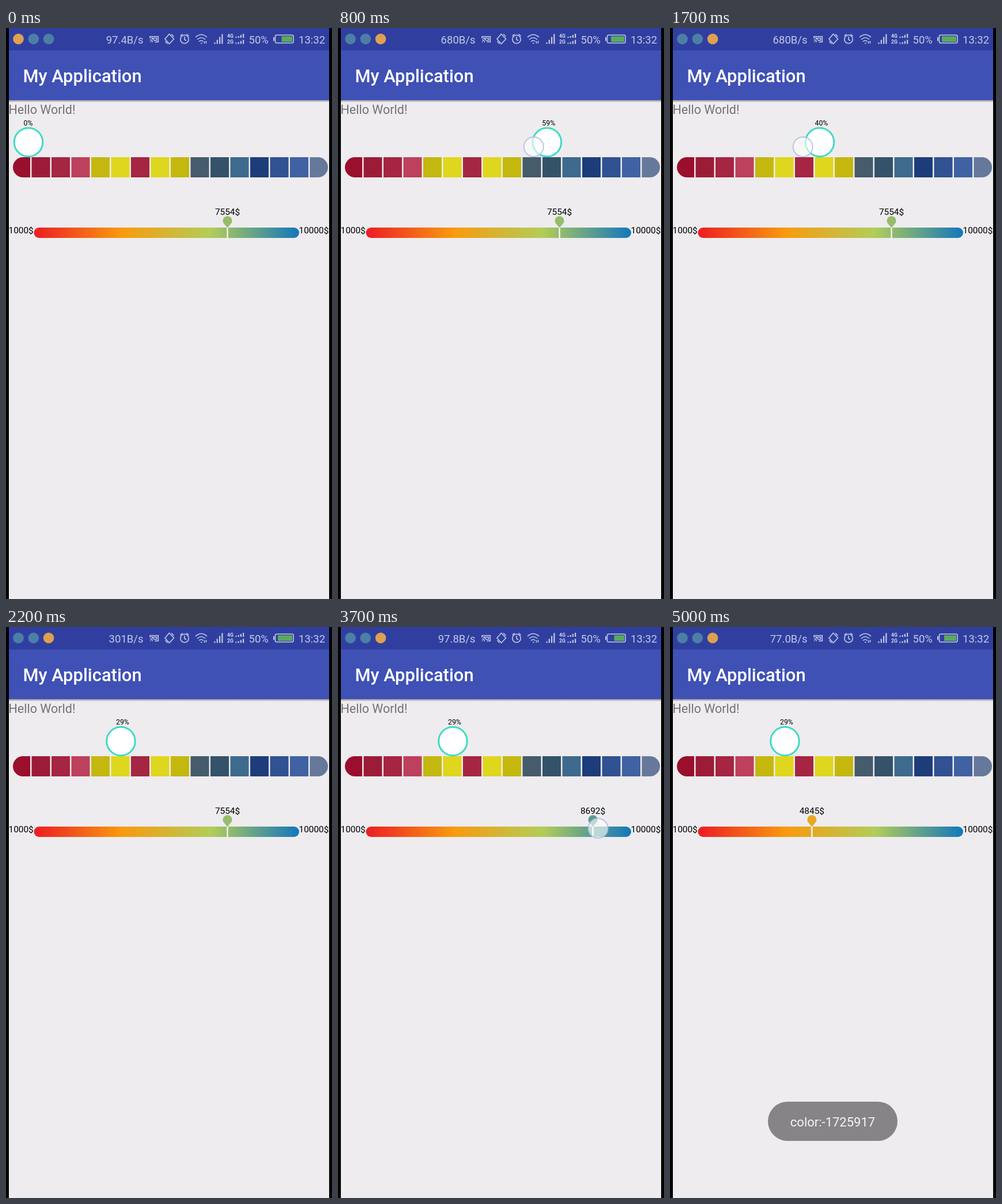
An HTML page for the animation above (5.1 s loop, 566 by 990 pixels).

```html
<!DOCTYPE html>
<html>
<head>
<meta charset="utf-8">
<style>
  html, body { margin: 0; height: 100%; overflow: hidden; background: #000; }
  svg { display: block; width: 566px; height: 990px; font-family: Roboto, sans-serif; }
  .status { fill: #c3c9e6; font-size: 18.5px; }
  .icon { fill: none; stroke: #c3c9e6; stroke-width: 1.6; }
  .net { fill: #d3d8ee; font-size: 8.6px; font-weight: 700; }
  .price { font-size: 15.4px; }
</style>
</head>
<body>
<svg viewBox="0 0 566 990">
  <defs>
    <linearGradient id="ramp"></linearGradient>
    <linearGradient id="shade" x2="0" y2="1">
      <stop stop-color="#8f8f96"/><stop offset="1" stop-color="#eeecee"/>
    </linearGradient>
    <clipPath id="pill"><rect x="12" y="224" width="547" height="35" rx="17.5"/></clipPath>
  </defs>

  <rect width="566" height="990"/>
  <rect x="5" width="556" height="990" fill="#eeecee"/>
  <rect x="5" y="125" width="556" height="4" fill="url(#shade)"/>
  <rect x="5" width="556" height="125" fill="#3f51b5"/>
  <rect x="5" width="556" height="39" fill="#303f9f"/>

  <g id="apps"></g>
  <text id="speed" class="status" x="238.5" y="27" text-anchor="end"></text>
  <g class="icon">
    <path d="M250 18v-3.3h14.3v9.6h-6M250 20.5q4 0 4.300 4M250 23.500q1 0 1.300 1M253 17.500h8.500v4h-4z"/>
    <path d="M283.500 10.500l8 8.500-8 8.500-7.500-8.500zM287 10.500l4.500 4.500M276.500 23l4 4.500"/>
    <circle cx="310" cy="19.500" r="7.200"/>
    <path d="M310 15v5l3 2M302.500 14l4-3.500M317.500 14l-4-3.500"/>
    <path d="M329 16Q339 7 349 16M332 20Q339 13.500 346 20M335 23.500Q339 20 342.500 23.500M338 26.500h2.500M344.500 23v4M347.500 22.500v4"/>
    <path id="bars" stroke-width="2.200"/>
    <rect x="467.500" y="12.300" width="31.500" height="13.700" rx="2.500"/>
    <path d="M465 16v6.500" stroke-width="2"/>
  </g>
  <text class="net" x="384" y="17">4G</text>
  <text class="net" x="384" y="27">2G</text>
  <rect id="charge" y="14.300" height="9.700" fill="#5aab5c"/>
  <text class="status" x="421.500" y="27">50%</text>
  <text class="status" x="508" y="27">13:32</text>

  <text x="29.500" y="94" fill="#fff" font-size="30.9" font-weight="500">My Application</text>
  <text x="4.500" y="149" fill="#737275" font-size="21.5">Hello World!</text>

  <g id="cells" clip-path="url(#pill)"></g>
  <text id="percent" y="169" font-size="12.3"></text>
  <circle id="thumb" cy="198" r="24.800" fill="#fff" stroke="#3cdcc4" stroke-width="3"/>

  <rect x="48.500" y="346" width="460.500" height="18" rx="9" fill="url(#ramp)"/>
  <text class="price" x="4.500" y="356">1000$</text>
  <text class="price" x="508.500" y="356">10000$</text>
  <g id="pin">
    <text id="value" class="price" y="324" text-anchor="middle"></text>
    <path id="drop" d="M-7 338A8 8 0 1 1 7 338L0 346.500Z"/>
    <path d="M0 346v18" stroke="#f6f4f0" stroke-width="2.600"/>
  </g>

  <circle id="touch" r="17" fill="#fff" fill-opacity=".62" stroke="#b4bce0" stroke-opacity=".85" stroke-width="2"/>

  <g id="toast">
    <rect x="170" y="823" width="225" height="68" rx="34" fill="#868486"/>
    <text x="282.500" y="866" fill="#f6f6f6" font-size="22" text-anchor="middle">color:-1725917</text>
  </g>
</svg>
<script>
const $ = id => document.getElementById(id);
const set = (el, attrs) => { for (const k in attrs) el.setAttribute(k, attrs[k]); return el; };
const add = (parent, tag, attrs) =>
  parent.appendChild(set(document.createElementNS('http://www.w3.org/2000/svg', tag), attrs));

const LOOP = 5100, STEP = 100;
const ramp = [[237, 28, 36], [248, 155, 15], [178, 205, 88], [19, 119, 189]];
const cells = ['9a0f2c', '9c1c38', 'a52542', 'bd405c', 'c4b80f', 'dfd61e', 'a52542', 'dfd61e',
  'c4b80f', '465b6b', '345269', '3d6a8d', '1c3d7a', '305192', '4062a3', '67799a'];

// Keys are [time, value]
const thumbKeys = [[100, 39], [200, 70], [400, 181], [700, 330], [1050, 445], [1300, 414],
  [1700, 260], [2000, 203], [2100, 199.5]];
const priceKeys = [[3300, 7554], [3500, 7760], [3700, 8692], [3800, 9400], [3950, 9380],
  [4200, 6900], [4400, 5605], [4600, 4845]];
const touchKeys = [[3300, 342], [3700, 349], [4400, 333]];
const speedKeys = [[0, '97.4B/s'], [700, '680B/s'], [1900, '301B/s'], [3300, '97.8B/s'], [4700, '77.0B/s']];
const chargeKeys = [[0, 478.5], [300, 476], [700, 474], [1000, 472], [2600, 479.5], [4100, 478], [4700, 476]];

const held = (keys, t) => keys.filter(k => k[0] <= t).pop()[1];

function tween(keys, t) {
  const i = keys.findIndex(k => k[0] > t);
  if (i < 0) return keys[keys.length - 1][1];
  if (!i) return keys[0][1];
  const [t0, a] = keys[i - 1], [t1, b] = keys[i];
  return a + (b - a) * (t - t0) / (t1 - t0);
}

function rampColor(f) {
  const i = Math.min(2, Math.floor(f * 3)), k = f * 3 - i;
  return `rgb(${ramp[i].map((c, j) => Math.round(c + (ramp[i + 1][j] - c) * k))})`;
}

const priceX = v => 384.5 + (v - 7554) * 0.051;

ramp.forEach((c, i) => add($('ramp'), 'stop', { offset: i / 3, 'stop-color': `rgb(${c})` }));
cells.forEach((c, i) =>
  add($('cells'), 'rect', { x: 10 + 34.5 * i, y: 224, width: 32, height: 35, fill: '#' + c }));
const dots = [0, 1, 2].map(i => add($('apps'), 'circle', { cx: 21.5 + 26.3 * i, cy: 19, r: 9.3 }));

const bars = (x, y, gap, heights) => heights.map((h, i) => `M${x + gap * i} ${y}v${-h}`).join('');
set($('bars'), { d: bars(362.5, 27.5, 4.3, [2.5, 7, 12, 17]) +
  bars(399.5, 17, 4.2, [2, 3, 5, 7]) + bars(399.5, 27.5, 4.2, [2, 3, 5, 7]) });

function draw(t) {
  const orange = t < 700 ? 0 : 2;
  dots.forEach((d, i) => set(d, { fill: i === orange ? '#dfa050' : '#4c7fa6' }));
  $('speed').textContent = held(speedKeys, t);
  const left = held(chargeKeys, t);
  set($('charge'), { x: left, width: 497 - left });

  const x = tween(thumbKeys, t);
  set($('thumb'), { cx: x });
  set($('percent'), { x: x - 8.5 });
  $('percent').textContent = Math.floor((x - 39) / 5.47) + '%';

  const price = tween(priceKeys, t);
  set($('pin'), { transform: `translate(${priceX(price)})` });
  set($('drop'), { fill: rampColor((price - 1000) / 9000) });
  $('value').textContent = Math.round(price) + '$';

  // The finger runs slightly ahead of the control it drags
  const first = t >= 100 && t < 2100, second = t >= 3300 && t < 4700;
  set($('touch'), {
    cx: first ? tween(thumbKeys, t + 12) - 27 : priceX(tween(priceKeys, t + 25)),
    cy: first ? 206 : tween(touchKeys, t),
    visibility: first || second ? 'visible' : 'hidden'
  });
  set($('toast'), { opacity: Math.max(0, Math.min(1, (t - 4600) / 400)) });
}

function frame(now) {
  draw(Math.floor(now % LOOP / STEP) * STEP);
  requestAnimationFrame(frame);
}
draw(0);
requestAnimationFrame(frame);
</script>
</body>
</html>
```
